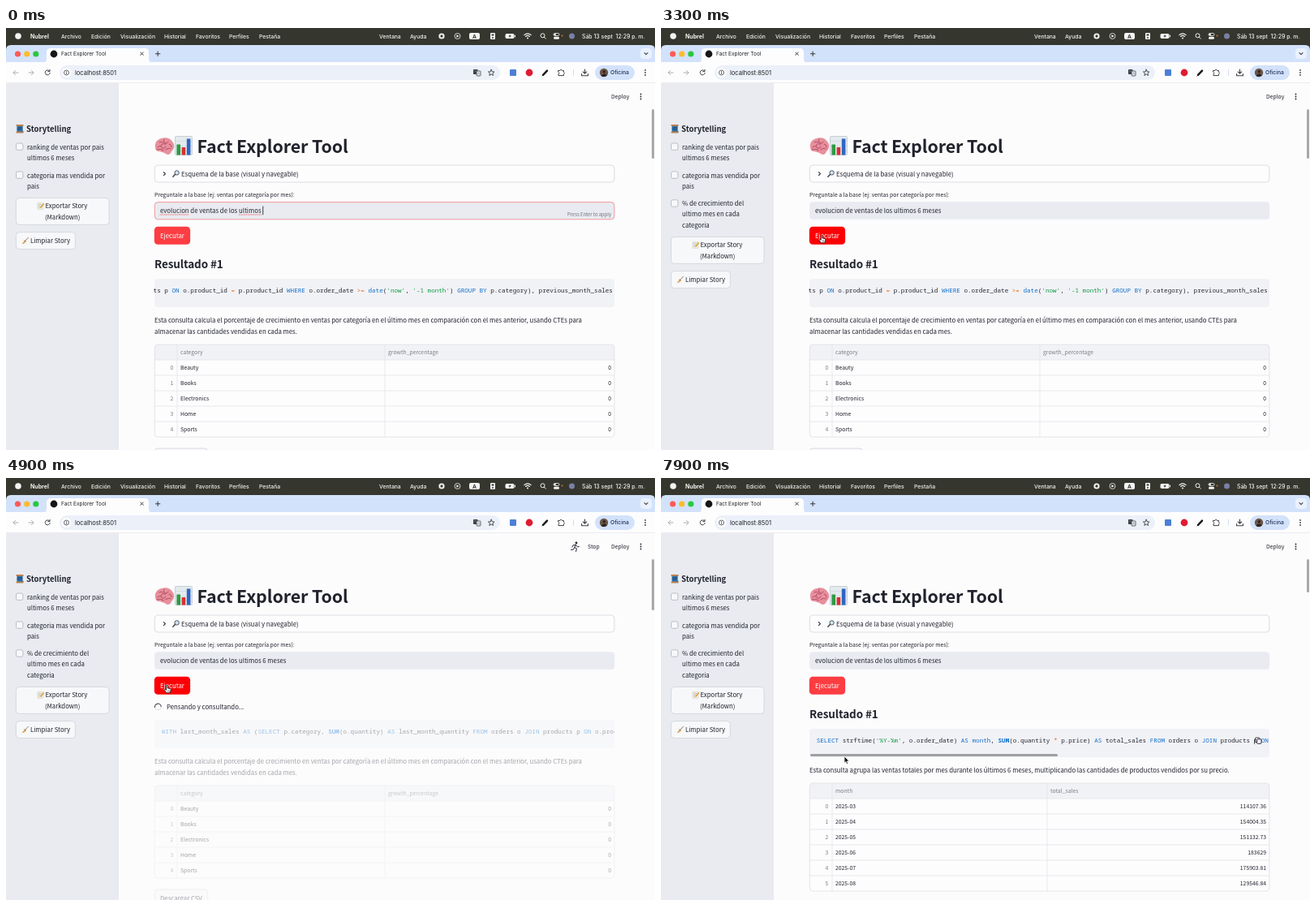
Animation, 800 px wide and 520 px high, one loop 8 s. Source, as an HTML page:

```html
<!DOCTYPE html>
<html lang="es">
<head>
<meta charset="utf-8">
<title>Fact Explorer Tool</title>
<style>
  html, body { margin: 0; width: 100%; height: 100%; overflow: hidden; background: #fcfcfc; }
  svg { display: block; }
  text { white-space: pre; }
  .ui { font-family: Inter, Roboto, sans-serif; }
  .page { font-family: "Noto Sans CJK JP", "Noto Sans CJK SC", "Noto Sans CJK KR", "Noto Sans CJK TC", "Noto Sans CJK", "Open Sans", sans-serif; fill: #20222c; }
  .code { font-family: "Noto Sans Mono", "DejaVu Sans Mono", monospace; font-size: 7.62px; fill: #262833; font-variant-ligatures: none; }
  .kw { fill: #1470c8; }
  .fn { fill: #0d6cc8; font-weight: 700; }
  .str { fill: #109a43; }
  .op { fill: #e8701c; }
  .line { fill: none; stroke-linecap: round; stroke-linejoin: round; }
</style>
</head>
<body>
<svg id="stage" width="800" height="520" viewBox="0 0 800 520"></svg>
<script>
const LOOP = 8000, STEP = 100;
const BLUR = 3000, RUN = 3600, RESULT = 6500, READY = 6900, IDLE = 7200;
const DARK = '#262833', GREY = '#7b7e89', RULE = '#e3e4e9';

// CSS pixels of the web page to stage pixels, for the page typeface
const em = px => px * 0.4872;

const text = (x, y, size, str, attrs = '') =>
  `<text x="${x}" y="${y}" font-size="${size}" ${attrs}>${str}</text>`;
const rect = (x, y, w, h, fill, r = 0, attrs = '') =>
  `<rect x="${x}" y="${y}" width="${w}" height="${h}" rx="${r}" fill="${fill}" ${attrs}/>`;
const dot = (x, y, r, fill, attrs = '') =>
  `<circle cx="${x}" cy="${y}" r="${r}" fill="${fill}" ${attrs}/>`;
const line = (d, color, w = 1, attrs = '') =>
  `<path class="line" d="${d}" stroke="${color}" stroke-width="${w}" ${attrs}/>`;
const shape = (d, fill, attrs = '') => `<path d="${d}" fill="${fill}" ${attrs}/>`;
const group = (id, body, attrs = '') => `<g id="${id}" ${attrs}>${body}</g>`;
const at = (x, y, body) => `<g transform="translate(${x} ${y})">${body}</g>`;
const dots = (x, y, color) => [-3, 0, 3].map(d => dot(x, y + d, 0.9, color)).join('');

function menuBar() {
  const items = [[68, 'Archivo'], [105, 'Edición'], [141, 'Visualización'], [195, 'Historial'],
    [234, 'Favoritos'], [275, 'Perfiles'], [312, 'Pestaña'], [460, 'Ventana'], [498, 'Ayuda']];
  const w = '#f4f4f2';
  return rect(0, 0, 800, 30, '#35362d') + `<g fill="${w}">` +
    dot(15, 10, 3.8, w) +
    text(30, 12.6, 7, 'Nubrel', 'font-weight="700"') +
    `<g font-weight="500">${items.map(([x, s]) => text(x, 12.6, 6.8, s)).join('')}</g>` +
    dot(537, 10, 3.6, w) + rect(535.6, 8.6, 2.8, 2.8, '#35362d', 0.5) +
    dot(556.5, 10, 3.5, 'none', `stroke="${w}" stroke-width=".8"`) + shape('M555.4 8.2L558.6 10L555.4 11.8Z', w) +
    rect(571, 6, 13, 8, w, 2) + text(575, 12.6, 6.8, 'A', 'style="fill:#222" font-weight="600"') +
    rect(597, 6, 6, 8, w, 1) + rect(598.6, 7.5, 2.8, 2, '#333') + rect(599.3, 11, 1.4, 2, '#333') +
    rect(615.5, 7, 11, 6, w, 1.8) + rect(627, 8.7, 1, 2.6, w) + shape('M621.6 7.5L619.5 10.4H621L620.3 12.6L622.8 9.6H621.2Z', '#222') +
    line('M638.8 8.7Q643 5 647.2 8.7M640.5 10.5Q643 8.2 645.5 10.5', w, 1.1) + dot(643, 12.4, 1, w) +
    dot(661.5, 9.3, 2.5, 'none', `stroke="${w}"`) + line('M663.4 11.2L665.3 13.1', w) +
    rect(675, 6.5, 7, 3, 'none', 1.5, `stroke="${w}" stroke-width=".8"`) + dot(676.7, 8, 1.2, w) +
    rect(675, 10.8, 7, 3, w, 1.5) + dot(685.5, 9.5, 1, '#d9703c') +
    dot(697.5, 10, 3.5, '#7a7fa6') +
    text(710, 12.6, 6.9, 'Sáb 13 sept  12:29 p. m.', 'font-weight="500"') + '</g>';
}

function browser() {
  const ink = '#3c3f44';
  return shape('M0 68V27Q0 21 6 21H794Q800 21 800 27V68Z', '#d3e2fb') +
    dot(14.5, 32, 3.6, '#fc5b57') + dot(25.7, 32, 3.6, '#fdbc2e') + dot(36.8, 32, 3.6, '#28c840') +
    shape('M45 43Q50 43 50 38V30Q50 25 55 25H171Q176 25 176 30V38Q176 43 181 43Z', '#fdfdfe') +
    rect(0, 42, 800, 26, '#fdfdfe') + rect(0, 67.4, 800, 0.6, '#dfe2e8') +
    dot(59, 32, 4.4, '#161616') +
    text(68, 34.3, 6.5, 'Fact Explorer Tool', 'fill="#1f2023"') +
    line('M165.8 30L169.2 33.4M169.2 30L165.8 33.4M184.4 31.8H189.8M187.1 29.1V34.5', '#33363b', 1) +
    rect(782, 25, 14, 13, '#eaf1fe', 4) + line('M787 30.6L789 32.6L791 30.6', ink, 1.1) +
    line('M15 55H9M11.6 52.4L9 55L11.6 57.6M28 55H34M31.4 52.4L34 55L31.4 57.6', '#a2a6ad', 0.9) +
    line('M53.6 53A3 3 0 1 0 54.2 55.4M54 51.4V53.6H51.8', ink, 1) +
    rect(66, 46, 543, 18, '#ebf0f9', 9) + dot(74.5, 55, 6, '#fdfdfe') +
    dot(74.5, 55, 3, 'none', `stroke="${ink}" stroke-width=".8"`) + line('M74.5 54.8V56.5M74.5 53.4V53.5', ink, 0.8) +
    text(85, 57.6, 7.5, 'localhost:8501', 'fill="#1f2023"') +
    rect(576, 51, 5.5, 6, ink, 0.8) + rect(580, 53, 5, 6, '#ebf0f9', 0.8, `stroke="${ink}" stroke-width=".8"`) +
    line('M577.4 53H580M581.3 57.4L582.5 54.6L583.7 57.4', '#8a8d92', 0.7) +
    line('M598.2 51.2L599.3 53.8L602 54L599.9 55.8L600.6 58.5L598.2 57L595.8 58.5L596.5 55.8L594.4 54L597.1 53.8Z', ink, 0.9) +
    rect(621, 51, 8, 8, '#4d7fd6', 1) + dot(645, 55, 4.4, '#df1b32') +
    line('M662 57.8L667 52.6', '#161616', 2.4) + line('M661 59L661.5 58.4', '#161616', 1) +
    line('M681 52.4H683Q684.2 49.6 685.4 52.4H687.4V54.4Q690 55.6 687.4 56.8V58.6H681V56.8Q683.4 55.6 681 54.4Z', ink, 1) +
    rect(699, 51, 0.8, 8, '#c9d6ee') +
    line('M713.5 51V56M711.3 54L713.5 56.2L715.7 54M709.6 56.6V58.8H717.4V56.6', ink, 1.1) +
    rect(726, 46, 49, 18, '#d3e2fb', 9) + dot(737, 55, 5.2, '#6b5647') +
    dot(737.3, 53.8, 1.7, '#2a2523') + shape('M733.6 58.9Q737 53.6 740.8 58.6Q737.4 61.4 733.6 58.9Z', '#2a2523') +
    text(745, 57.4, 6.7, 'Oficina', 'fill="#1c2f57" font-weight="500"') + dots(788, 55, ink);
}

const emoji = {
  spool: rect(1, 2, 7, 7, '#2d6fa8') + rect(0, 0, 9, 2, '#b98050', 0.6) + rect(0, 8.4, 9, 2, '#b98050', 0.6) +
    line('M1.4 4.2L7.6 3.4M1.4 6.2L7.6 5.4M7.6 7.4L8.8 8.6', '#184a78', 0.8),
  brain: shape('M1 12C0 7 3 2 9 1C14 -1 20 1 22 5C26 9 24 15 21 17C20 21 16 22 14 20C11 18 9 18 6 17C3 17 1 15 1 12Z', '#e8909d') +
    line('M4 12Q7 9 9 12T14 11M6 6Q9 4 11 7T17 5M14 15Q17 12 20 14M12 2Q10 5 14 7M3 15Q8 13 11 16M18 8Q21 9 21 12M10 8Q8 9 8 11', '#b9546a', 1.1),
  chart: rect(0, 0, 21, 23, '#e4eaee', 1, 'stroke="#b4c1ca" stroke-width=".7"') +
    line('M1 6H20M1 12H20M1 18H20', '#c3d0d8', 0.5) +
    rect(2, 10, 4.6, 13, '#2f9a45') + rect(8.2, 13.5, 4.6, 9.5, '#d6322f') + rect(14.4, 3, 4.6, 20, '#2f66c4'),
  lens: dot(5.6, 3.2, 2.7, '#cfe3ef', 'stroke="#41474e" stroke-width=".9"') + line('M3.4 5.2L0.8 8', '#41474e', 1.5),
  memo: rect(0.4, 0.8, 7, 8, '#f3f1e6', 0.5, 'stroke="#c4c2b6" stroke-width=".5"') +
    line('M1.8 3H6M1.8 4.8H5.4M1.8 6.6H4.4', '#8c98a4', 0.5) + line('M8 2.2L4.4 6.6', '#e5a02c', 1.4),
  broom: line('M8 0.6L4 4.8', '#8c5a34', 0.8) + shape('M4.4 4L5 5.4Q4 8.2 0.8 8.6L0.4 7.6Q2.4 6.2 3 4.6Z', '#d3a552') +
    line('M3.2 4.4L5 5.6', '#a8483a', 0.7)
};

const box = y => rect(12.5, y, 8.4, 8.4, '#f7f8fb', 2, 'stroke="#aeb1bc" stroke-width=".8"');
const button = (x, y, w, h) => rect(x, y, w, h, '#f7f8fa', 4, 'stroke="#cfd1d8" stroke-width=".8"');
const check = (y, lines) => box(y - 7.6) + lines.map((s, i) => text(26, y + 13.05 * i, em(16), s)).join('');

function sidebar() {
  return rect(0, 68, 139, 452, '#e9ebf0') +
    at(12.5, 119, emoji.spool) + text(25, 128.4, em(19.6), 'Storytelling', 'font-weight="700"') +
    check(149.6, ['ranking de ventas por pais', 'ultimos 6 meses']) +
    check(184.5, ['categoria mas vendida por', 'pais']) +
    group('third', check(219.4, ['% de crecimiento del', 'ultimo mes en cada', 'categoria'])) +
    group('actions', button(12.4, 209.4, 114.6, 33) + at(38.5, 214.6, emoji.memo) +
      text(48.5, 222, em(16), 'Exportar Story') + text(69.7, 235.7, em(16), '(Markdown)', 'text-anchor="middle"') +
      button(12.4, 251.6, 73, 21) + at(19.5, 257.6, emoji.broom) + text(30, 265.2, em(16), 'Limpiar Story'));
}

function form() {
  return at(183, 135, emoji.brain) + at(208.4, 133.5, emoji.chart) +
    text(235.5, 153.6, em(44), 'Fact Explorer Tool', 'font-weight="700" letter-spacing="-.12"') +
    rect(183.3, 169, 566.6, 21, '#fdfdfe', 4, 'stroke="#d3d5db" stroke-width=".8"') +
    line('M194.4 177.6L196.4 179.6L194.4 181.6', DARK, 1.1) + at(205, 175.2, emoji.lens) +
    text(216, 182.5, em(16), 'Esquema de la base (visual y navegable)') +
    text(183, 207.8, em(14), 'Preguntale a la base (ej: ventas por categoría por mes):') +
    rect(183.3, 214.6, 566.6, 21.2, '#e9ebf0', 4, 'id="field" stroke-width=".6"') +
    text(190, 228.2, em(16), '', 'id="query"') +
    group('focus', rect(0, 219.6, 0.9, 10.6, DARK, 0, 'id="caret"') +
      line('M190 230H225M287.5 230H315', '#e2322f', 0.9, 'stroke-dasharray=".1 1.7"') +
      text(746, 232, em(12), 'Press Enter to apply', `text-anchor="end" fill="#6d707b"`)) +
    rect(182.8, 244.7, 44.3, 22, '#fc3d42', 4.3, 'id="run"') +
    text(190, 258.7, em(16), 'Ejecutar', 'fill="#fff"');
}

const WORDS = 'WITH|AS|SELECT|FROM|JOIN|ON|WHERE|GROUP|BY|month(?=,)|date(?=\\()';
const TOKENS = new RegExp(`('[^']*')|\\b(SUM)\\b|\\b(${WORDS})\\b|(>=|=|\\*)`, 'g');
const paint = sql => sql.replace(TOKENS, (s, str, fn, kw) =>
  `<tspan class="${str ? 'str' : fn ? 'fn' : kw ? 'kw' : 'op'}">${s.replace('>', '&gt;')}</tspan>`);

const codeBlock = (y, x, sql) => rect(183, y, 567, 35, '#f1f2f6', 4) +
  `<svg x="182" y="${y}" width="567.5" height="35"><text class="code" x="${x}" y="17">${paint(sql)}</text></svg>`;

function table(y, split, heads, rows) {
  const bottom = y + 19 * (rows.length + 1);
  let out = rect(183.3, y, 566.6, bottom - y, '#fdfdfe', 4) +
    shape(`M183.3 ${y + 19}V${y + 4}Q183.3 ${y} 187.3 ${y}H746Q750 ${y} 750 ${y + 4}V${y + 19}Z`, '#f1f2f5') +
    text(215, y + 12.2, em(14), heads[0], `fill="${GREY}"`) +
    text(split + 4, y + 12.2, em(14), heads[1], `fill="${GREY}"`);
  rows.forEach(([name, value], i) => {
    const top = y + 19 * (i + 1), base = top + 12.2;
    out += rect(183.3, top - 0.4, 566.6, 0.8, RULE) +
      text(206.4, base, em(14), i, `text-anchor="end" fill="${GREY}"`) +
      text(215, base, em(14), name) + text(746, base, em(14), value, 'text-anchor="end"');
  });
  return out + [211, split].map(x => rect(x - 0.4, y, 0.8, bottom - y, RULE)).join('') +
    rect(183.3, y, 566.6, bottom - y, 'none', 4, 'stroke="#dddfe4" stroke-width=".8"');
}

const OLD_HEAD = "WITH last_month_sales AS (SELECT p.category, SUM(o.quantity) AS last_month_quantity FROM orders o JOIN products p ON o.product_id";
const OLD_TAIL = "ts p ON o.product_id = p.product_id WHERE o.order_date >= date('now', '-1 month') GROUP BY p.category), previous_month_sales";
const NEW_SQL = "SELECT strftime('%Y-%m', o.order_date) AS month, SUM(o.quantity * p.price) AS total_sales FROM orders o JOIN products p ON o.product_id";

const oldTable = y => table(y, 467, ['category', 'growth_percentage'],
  ['Beauty', 'Books', 'Electronics', 'Home', 'Sports'].map(c => [c, 0]));
const sales = ['114107.36', '154004.35', '151132.73', '183629', '175903.81', '129546.84'];
const newTable = y => table(y, 476, ['month', 'total_sales'], sales.map((v, i) => [`2025-0${i + 3}`, v]));
const oldNote = y => text(183, y, em(16), 'Esta consulta calcula el porcentaje de crecimiento en ventas por categoría en el último mes en comparación con el mes anterior, usando CTEs para') +
  text(183, y + 13.9, em(16), 'almacenar las cantidades vendidas en cada mes.');
const download = y => button(183.3, y, 65.4, 21) + text(190, y + 13.5, em(16), 'Descargar CSV');

function results() {
  return group('title', text(183, 296, em(27.6), 'Resultado #1', 'font-weight="700" letter-spacing="-.07"')) +
    group('before', codeBlock(309, -0.4, OLD_TAIL) + oldNote(362.8) + oldTable(390) + download(518)) +
    group('waiting', dot(187.3, 282, 3.9, 'none', 'stroke="#dcdde2" stroke-width=".9"') +
      line('M187.3 278.1A3.9 3.9 0 0 1 187.3 285.9', '#3c3e49', 1, 'id="spin"') +
      text(198, 285.1, em(16), 'Pensando y consultando...') +
      group('stale', codeBlock(298, 9.7, OLD_HEAD) + oldNote(351.9) + oldTable(379) + download(507))) +
    group('fresh', codeBlock(309, 9.7, NEW_SQL)) +
    group('partial', oldTable(354) + download(482) + rect(219, 518.6, 306, 2, '#777'), 'opacity=".33"') +
    group('after', text(183, 362.8, em(16), 'Esta consulta agrupa las ventas totales por mes durante los últimos 6 meses, multiplicando las cantidades de productos vendidos por su precio.') +
      newTable(376) +
      group('hover', rect(184, 340, 305, 3, '#9fa0a4', 1.5) +
        rect(732.4, 320, 5.4, 5.6, 'none', 1, `stroke="${DARK}" stroke-width=".9"`) +
        rect(734.6, 321.8, 5.4, 5.6, '#f1f2f6', 1, `stroke="${DARK}" stroke-width=".9"`)));
}

const sports = [
  dot(8, 1.4, 1.4, DARK) + line('M7.6 3.6L5.8 7L8.4 8.4L7.6 12M5.8 7L4.4 9.6L1.6 10M7.4 3.8L4 4.4L3 6.6M7.4 4L9.4 6.4L11.4 6', DARK, 1),
  dot(2.8, 8.6, 2.4, 'none', `stroke="${DARK}" stroke-width=".8"`) + dot(10.8, 8.6, 2.4, 'none', `stroke="${DARK}" stroke-width=".8"`) +
    dot(8.6, 0.9, 1.2, DARK) + line('M6.6 9.8V7.4L4.4 5.4L7 2.8L8.8 4.8H10.8', DARK, 0.9),
  dot(9.8, 4.2, 1.3, DARK) + line('M2.2 1.4L5.8 0.9L7.6 3.4L3.6 5.4', DARK, 1) +
    line('M1 7.2Q2.7 5.9 4.2 7.2T7.2 7.2T10.2 7.2T12.6 7M1 9.8Q2.7 8.5 4.2 9.8T7.2 9.8T10.2 9.8T12.6 9.6', DARK, 0.9)
];

const pointers =
  group('arrow', shape('M0 0V8.2L1.9 6.5L3.2 9.4L4.6 8.8L3.3 5.9H6Z', '#111', 'stroke="#fff" stroke-width=".7"')) +
  group('hand', shape('M-.8 .8Q0 -.5 .8 .8V4L4 4.6Q5 5 4.7 6.4L3.9 9.8H-.6L-3 6.4Q-3 5 -1.8 5.6L-.8 6.4Z', '#fff', 'stroke="#151515" stroke-width=".8"') +
    line('M1.3 6.6V8.4M2.8 6.6V8.4', '#151515', 0.5));

document.getElementById('stage').innerHTML =
  `<g class="ui">${menuBar()}${browser()}</g>` +
  `<g class="page">${rect(139, 68, 661, 452, '#fcfcfd')}${sidebar()}${form()}${results()}` +
  text(746, 87, em(14), 'Deploy') + dots(782.5, 84.5, DARK) +
  group('status', at(695, 78.5, sports.map((s, i) => group('sport' + i, s)).join('')) + text(717, 87, em(14), 'Stop')) +
  rect(796, 100, 3, 61, '#a7a8ab', 1.5, 'id="bar"') + '</g>' + group('pointer', pointers);

const el = id => document.getElementById(id);
const show = (id, on) => { el(id).style.display = on ? '' : 'none'; };
const clamp = v => Math.min(1, Math.max(0, v));

const BASE = 'evolucion de ventas de los ultimos ';
const keys = [[900, '6'], [1100, ' '], [1300, 'm'], [1400, 'e'], [1500, 's'], [1600, 'e'], [1800, 's']];
const route = [[2200, 262, 300], [2700, 198, 255], [4800, 198, 255], [5500, 205, 255],
  [6000, 205, 255], [6500, 195.5, 255], [7300, 195.5, 255], [7700, 226, 343]];

function pointerAt(t) {
  let i = 0;
  while (i < route.length - 2 && t > route[i + 1][0]) i++;
  const [t0, x0, y0] = route[i], [t1, x1, y1] = route[i + 1];
  const p = clamp((t - t0) / (t1 - t0)), e = p * p * (3 - 2 * p);
  return [x0 + (x1 - x0) * e, y0 + (y1 - y0) * e];
}

function render(t) {
  const focused = t < BLUR, running = t >= RUN && t < IDLE;
  const waiting = t >= RUN && t < RESULT;

  el('query').textContent = BASE + keys.filter(k => t >= k[0]).map(k => k[1]).join('');
  el('caret').setAttribute('x', 190 + el('query').getComputedTextLength());
  show('caret', t < 2300 || t >= 2800);
  show('focus', focused);
  el('field').setAttribute('stroke', focused ? '#ee5a60' : '#e9ebf0');

  show('third', !focused);
  el('actions').setAttribute('transform', `translate(0 ${focused ? 0 : 48})`);

  show('title', !waiting);
  show('before', t < RUN);
  show('waiting', waiting);
  show('fresh', t >= RESULT);
  show('partial', t >= RESULT && t < READY);
  show('after', t >= READY);
  el('stale').setAttribute('opacity', 1 - 0.67 * clamp((t - 4000) / 1000));
  el('spin').setAttribute('transform', `rotate(${153 + (t - RUN) * 0.36} 187.3 282)`);

  show('status', running);
  const sport = Math.floor(Math.max(0, t - RUN) / 400) % 3;
  sports.forEach((_, i) => show('sport' + i, i === sport));
  el('bar').setAttribute('height', t < RUN ? 61 : t < READY ? 63 : 41);

  const [x, y] = pointerAt(t), visible = t >= route[0][0];
  const onButton = visible && x > 183 && x < 227 && y > 244 && y < 266;
  show('pointer', visible);
  show('hand', onButton);
  show('arrow', !onButton);
  el('pointer').setAttribute('transform', `translate(${x} ${y})`);
  el('run').setAttribute('fill', onButton ? '#fd0006' : '#fc3d42');
  show('hover', y > 309 && y < 344);
}

const start = performance.now();
function tick() {
  const t = (performance.now() - start) % LOOP;
  render(Math.floor(t / STEP) * STEP);
  requestAnimationFrame(tick);
}
tick();
</script>
</body>
</html>
```
